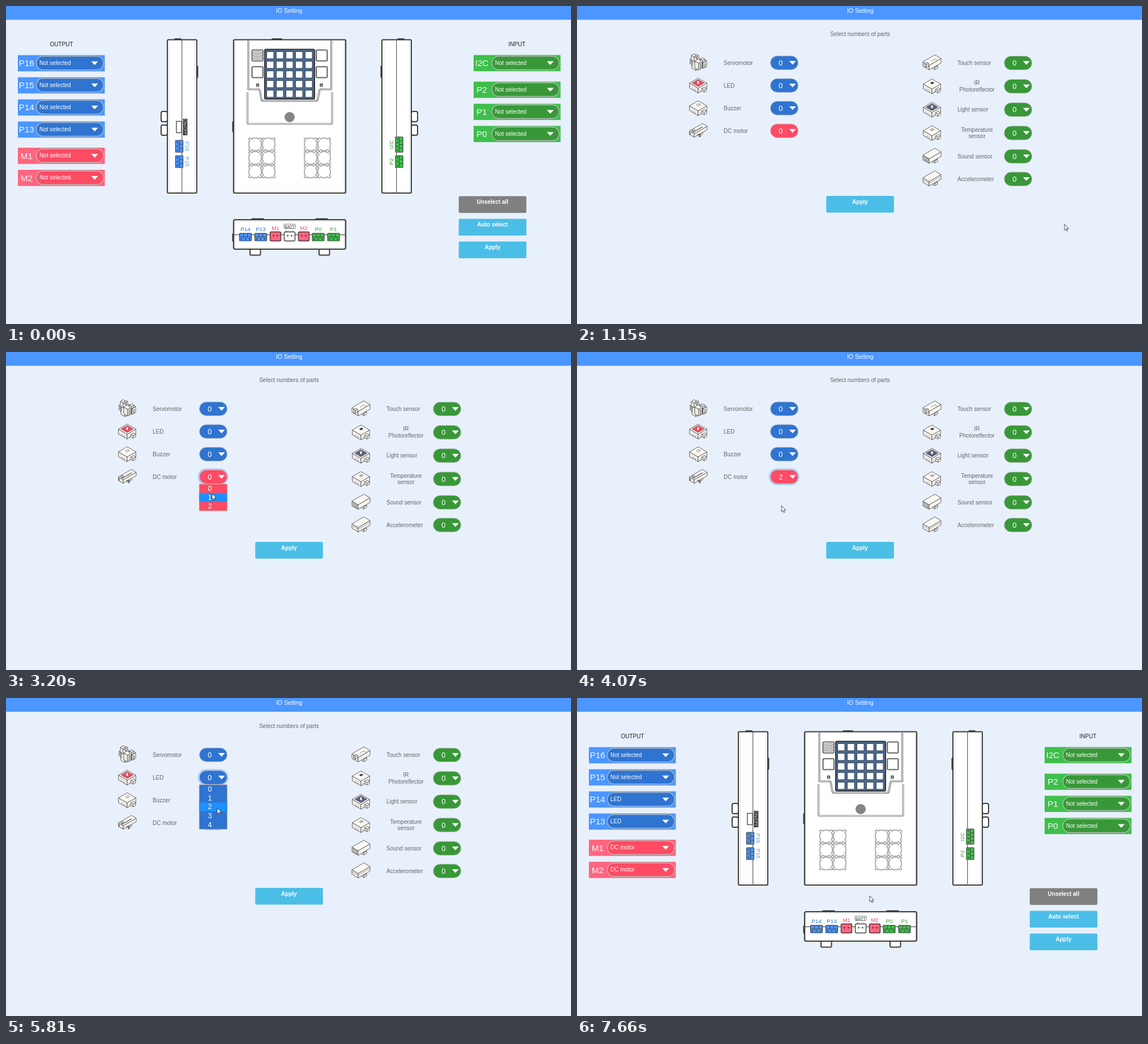
Write an HTML page that moves like this. It is 998x561 px and loops after 8.67 s.

```html
<!DOCTYPE html>
<html lang="en">
<head>
<meta charset="utf-8">
<title>IO Setting</title>
<style>
html, body { margin: 0; width: 100%; height: 100%; overflow: hidden; background: #e8f0fc; }
svg { display: block; width: 998px; height: 561px; font-family: "Liberation Sans", Arial, sans-serif; }
</style>
</head>
<body>
<svg id="stage" viewBox="0 0 998 561"></svg>
<script>
const LOOP = 8670;
const BLUE = '#4b96ff', NAVY = '#2f74d0', PINK = '#ff6680', RED = '#ff4b64';
const LIME = '#3fbf4b', GREEN = '#389838', SKY = '#4bbee7', INK = '#3c3c3c';

const text = (x, y, s, size = 10, fill = '#fff', more = '') =>
  `<text x="${x}" y="${y}" font-size="${size}" fill="${fill}" ${more}>${s}</text>`;
const mid = (x, y, s, size, fill, more = '') => text(x, y, s, size, fill, 'text-anchor="middle" ' + more);
const rect = (x, y, w, h, fill, stroke = 'none', sw = 1, r = 0) =>
  `<rect x="${x}" y="${y}" width="${w}" height="${h}" rx="${r}" fill="${fill}" stroke="${stroke}" stroke-width="${sw}"/>`;
const path = (d, fill = 'none', stroke = 'none', sw = 1) =>
  `<path d="${d}" fill="${fill}" stroke="${stroke}" stroke-width="${sw}" stroke-linejoin="round"/>`;
const move = (x, y, s, turn = 0) => `<g transform="translate(${x} ${y}) rotate(${turn})">${s}</g>`;
const box = (x, y, w, h, r = 2, sw = 2) => rect(x, y, w, h, '#fff', INK, sw, r);
const arrowDown = (x, y) => path(`M${x - 6} ${y}h12l-6 6.5z`, '#fff');
const double = (d, color) => path(d, 'none', color, 3.2) + path(d, 'none', '#fff', 1);
const button = (x, y, s, fill) =>
  rect(x, y, 119.5, 29.5, fill, 'none', 0, 2) + mid(x + 59.7, y + 13.6, s, 10, '#fff', 'font-weight="bold"');

// First screen: port selectors
function port(x, y, name, fill, dark, cls = '') {
  const right = x > 500;
  const px = right ? 858.4 : 53.6;
  return rect(x, y, 153.5, 28.6, fill) +
    mid(right ? 840.5 : 36.3, y + 19.5, name, 15.2, '#f4f8ff') +
    rect(px, y + 2, 118.6, 24, dark, '#b9b9b9', 1.3, 12) +
    text(px + 5.4, y + 17.2, 'Not selected', 10, '#fff', `class="${cls}"`) +
    arrowDown(px + 103, y + 11);
}

function plug(x, y, fill, turn = 0, w = 21) {
  const l = -w / 2, n = w > 24 ? 4 : 3, gap = w / n;
  let s = rect(l, -6.6, w, 13.2, fill, INK, 1.1, 1) + path(`M${l} 0h${w}`, 'none', INK, .9);
  for (let i = 0; i < n; i++) {
    const c = l + gap * (i + .5);
    if (i) s += path(`M${l + gap * i} -6.6v6.6`, 'none', INK, .9);
    s += rect(c - 1.1, 2.2, 2.2, 2.2, INK);
  }
  return move(x, y, s, turn);
}

const pair = (x, fill) => rect(x - 9.5, 398.5, 19, 16, fill, INK, 1.4, 2) +
  rect(x - 4.6, 404, 2.4, 2.4, INK) + rect(x + 2.2, 404, 2.4, 2.4, INK);

function gear(x, y) {
  const side = path('M-11 -11h3.500a1.600 1.800 0 0 0 3.200 0h8.600a1.600 1.800 0 0 0 3.200 0h3.500', 'none', '#9c9c9c', 1.5);
  return [0, 90, 180, 270].map(a => move(x, y, side, a)).join('');
}

function sideView(x, flip) {
  const feet = flip ? x + 52 : x - 11;
  let s = [186, 210].map(y => box(feet, y, 11, 18, 3)).join('');
  s += box(flip ? x - 1.5 : x + 50, 106, 3.5, 20, 1) + box(x + (flip ? 28 : 13), 58, 11, 4, 1);
  s += box(x, 59.5, 52, 270.5);
  s += path(`M${x + 3} 62v266M${x + 49} 62v266`, 'none', '#d4d4d4', 1);
  return s + path(`M${x + 25.7} 60v270`, 'none', '#666', 1.3);
}

function frontView() {
  let s = box(470, 58, 17, 4, 1) + box(400.5, 204, 4, 18, 1) + box(402, 59.5, 198, 270.5, 2, 2.2);
  s += path('M404.500 61.500v266M597.500 61.500v266', 'none', '#d4d4d4', 1);
  s += double('M428 61V147H445Q448 147 448.500 150L451 164Q451.500 167.500 455 167.500H547Q550.500 167.500 551 164L553.500 150Q554 147 557 147H574.500V61', '#777');
  s += double('M426.500 152V205Q426.500 208 429 208H573.500Q576 208 576 205V152', '#8a8a8a');
  s += rect(457, 76.5, 88, 87.5, '#4d6a8c', '#333', 2, 2);
  for (let i = 0; i < 25; i++)
    s += rect(460.5 + i % 5 * 17, 80.5 + (i / 5 | 0) * 17, 12.5, 12.5, '#fff', '#2f4358', 1);
  for (const x of [434.5, 548]) {
    for (const y of [77.5, 107])
      s += rect(x, y, 19.5, 19.5, '#fff', '#444', 1.6, 2) + rect(x + 2, y + 2, 15.5, 15.5, 'none', '#ccc', .8, 1);
  }
  for (const y of [81, 86, 91]) s += rect(436.5, y, 15.5, 2.6, '#fff', '#666', 1, 1);
  for (const x of [442.5, 555]) s += rect(x, 137.5, 4, 4, '#bbb', '#333', 1.2);
  s += '<circle cx="501" cy="196" r="9" fill="#858585"/>';
  for (const x of [440, 464, 538, 562])
    for (const y of [244, 268, 292]) s += gear(x, y);
  return s;
}

function bottomView() {
  let s = box(434, 375.5, 21, 5, 1) + box(547, 375.5, 21, 5, 1) + box(400.5, 402, 4, 13, 1);
  s += box(431, 427, 18.5, 12.5) + box(553, 427, 18.5, 12.5);
  s += box(402, 377, 198, 52, 3, 2.2) + path('M404.500 379.500h193v47h-193z', 'none', '#d4d4d4', 1);
  s += path('M402 403.500h198', 'none', '#666', 1.5);
  for (const [x, n, c] of [[423, 'P14', BLUE], [450, 'P13', BLUE], [551.5, 'P0', LIME], [578.5, 'P1', LIME]])
    s += plug(x, 407.7, c) + mid(x, 396.6, n, 9.8, c === LIME ? GREEN : NAVY);
  for (const [x, n] of [[476, 'M1'], [526, 'M2']]) s += pair(x, PINK) + mid(x, 394.8, n, 9.8, '#e84a5c');
  s += rect(491, 385, 20, 7.5, '#fff', '#555', .8, 1) + mid(501, 391.5, 'BATT', 7, '#333');
  return s + mid(495.5, 397.6, '+', 6, '#333') + mid(506, 397.6, '−', 6, '#333') + pair(501, '#fff');
}

function firstScreen() {
  let s = mid(98, 71, 'OUTPUT', 10, '#222') + mid(902.5, 71, 'INPUT', 10, '#222');
  ['P16', 'P15', 'P14', 'P13'].forEach((n, i) => s += port(21, 86.7 + 39 * i, n, BLUE, NAVY, i > 1 ? 'led' : ''));
  ['M1', 'M2'].forEach((n, i) => s += port(21, 250 + 39 * i, n, PINK, RED, 'motor'));
  [['I2C', 86.5], ['P2', 133.5], ['P1', 172.5], ['P0', 211.5]].forEach(([n, y]) => s += port(826, y, n, LIME, GREEN));
  s += button(799.7, 335.5, 'Unselect all', '#808080') + button(799.7, 375.5, 'Auto select', SKY) +
    button(799.7, 415.5, 'Apply', SKY);
  s += sideView(285, false) + sideView(664, true) + frontView() + bottomView();
  s += rect(301, 203.5, 9, 20, '#fff', '#555', 1.5) + rect(312.7, 199, 7.6, 29, '#222') +
    move(314, 213.5, mid(0, 0, 'ON/OFF', 7.4, '#fff'), 90);
  for (const [n, y] of [['P16', 247.5], ['P15', 274.5]])
    s += plug(306, y, BLUE, 90) + move(317.3, y, mid(0, 0, n, 9.8, BLUE), 90);
  for (const [n, y, w] of [['I2C', 244.5, 27], ['P2', 274.5, 21]])
    s += plug(694.5, y, LIME, 90, w) + move(683.5, y, mid(0, 0, n, 9.8, GREEN), -90);
  return s;
}

// Second screen: part icons from isometric blocks; (x, y) is the front corner of the top face
function iso(x, y, a, b, h, top = '#fbf8f4') {
  const k = .58, la = a * k, lb = b * k, line = '#555';
  return path(`M${x} ${y}l${-a} ${-la}v${h}l${a} ${la}z`, '#efebe6', line, .9) +
    path(`M${x} ${y}l${b} ${-lb}v${h}l${-b} ${lb}z`, '#f7f4ef', line, .9) +
    path(`M${x} ${y}l${-a} ${-la}l${b} ${-lb}l${a} ${la}z`, top, line, .9);
}
const peg = (x, y) => path(`M${x - 1.8} ${y}v-4q1.800 -2 3.600 0v4q-1.800 1.500 -3.600 0z`, '#fff', '#777', .7);
const lid = (c, w) => path(`M0 ${-4.2 - w * .58}l${w} ${w * .58}l${-w} ${w * .58}l${-w} ${-w * .58}z`, c, '#666', .6);
const cube = inner => iso(0, 5, 15.3, 15.3, 8.5) + inner + iso(10.5, 7.5, 4, 4.5, 4.5) +
  path('M-9 5v3M-5 7v3M4 8v3', 'none', '#777', .8);
const bar = (h, more = '') => iso(5, 8, 4, 5, 4) + iso(-5, 4.5, 11, 21, h) + more;
const slot = c => path('M-3 -5.500l4 -2.200 3 1.800 -4 2.200z', c, '#555', .7);

const icons = {
  servo: iso(-4, -2, 7, 8, 16) + iso(-7, -10, 5, 5, 9) + iso(-2, -11, 3, 3, 4) + iso(9, 0, 8, 6, 10) +
    iso(1, 1, 7, 6, 12) + iso(8, -4, 4, 4, 4) +
    path('M-14 -7v10M-11 -5v11M4 1v10M7 0v9M12 1v8', 'none', INK, 1.1),
  led: cube(lid('#f04a60', 11) + peg(0, -3)),
  buzzer: cube(slot('#fff')),
  motor: iso(4, 5, 3, 4, 3) + iso(-7, 5.5, 8.5, 23, 6) + iso(-8, 1, 3, 3, 2) +
    path('M-14 3v4M-2 8l4 -2v5l3 -2M-4 0l12 -7', 'none', INK, 1.1),
  touch: bar(8, iso(-10, 3, 3, 4, 5) + path('M-2 -3l7 -4 4 2', 'none', '#777', .8)),
  infra: cube(slot('#333')),
  light: cube(lid('#59607c', 11) + peg(0, -3)),
  heat: cube(slot('#d8d2cc')),
  sound: bar(8, path('M-14 0v8M-11.500 1.500v8M-9 3v8M-6.800 4.200v7', 'none', '#555', 1.2) +
    path('M-16 1.500l11 6M-16 4.500l11 6', 'none', '#eee', .7)),
  accel: bar(8, path('M-16 1.500l11 6 21 -12', 'none', '#888', .8))
};

function part(x, y, icon, label, fill, id = '') {
  const labels = label.split('|');
  const px = x + 127.3;
  let s = move(x, y, icons[icon]);
  if (labels.length > 1)
    labels.forEach((l, i) => s += mid(x + 79.5, y - 2.3 + 11.4 * i, l, 10, '#666'));
  else s += text(x + 45, y + 3.6, label, 10, '#666');
  return s + rect(px + .3, y - 12, 49, 24.4, fill, '#c3c3c3', .9, 12.2) +
    mid(px + 18.6, y + 4.7, '0', 13, '#fff', id && `id="${id}"`) + arrowDown(px + 39.5, y - 3);
}

const secondScreen = () => mid(500, 53, 'Select numbers of parts', 10, '#666') +
  part(214, 100, 'servo', 'Servomotor', NAVY) + part(214, 140, 'led', 'LED', NAVY, 'ledCount') +
  part(214, 180, 'buzzer', 'Buzzer', NAVY) + part(214, 220, 'motor', 'DC motor', RED, 'motorCount') +
  part(627, 100.3, 'touch', 'Touch sensor', GREEN) + part(627, 141.5, 'infra', 'IR|Photoreflector', GREEN) +
  part(627, 182.7, 'light', 'Light sensor', GREEN) + part(627, 223.8, 'heat', 'Temperature|sensor', GREEN) +
  part(627, 265, 'sound', 'Sound sensor', GREEN) + part(627, 305, 'accel', 'Accelerometer', GREEN) +
  button(440.3, 335, 'Apply', SKY);

const stage = document.getElementById('stage');
stage.innerHTML = rect(0, 0, 998, 561, '#e8f0fc') + rect(0, 0, 998, 24.3, BLUE) +
  mid(500.3, 11.8, 'IO Setting', 10.5) +
  `<g id="first">${firstScreen()}</g><g id="second">${secondScreen()}</g><g id="live"></g>`;
const $ = id => document.getElementById(id);
const first = $('first'), second = $('second'), live = $('live');

// Pointer: time, x, y
const track = [
  [210, 923, 509], [700, 861, 385], [1620, 861, 385], [2020, 338, 248], [2180, 310, 200], [2340, 322, 180],
  [2500, 371, 222], [2650, 363, 222], [3040, 363, 222], [3200, 364, 250], [3430, 361, 274], [3990, 361, 274],
  [4920, 381, 140], [5480, 381, 140], [5810, 373, 194], [6420, 373, 194], [6880, 517, 349], [LOOP, 517, 349]
];
const clicks = [[980, 1080], [2820, 2890], [3580, 3750], [5090, 5240], [6110, 6180], [7200, 7280]];
const within = (t, a, b) => t >= a && t < b;

// The screen was sampled about every 80 ms, so the pointer advances in steps
function pointer(t) {
  const i = track.findIndex((k, n) => n && t < k[0]);
  const [a, x, y] = track[i - 1], [b, x2, y2] = track[i];
  const n = Math.round((b - a) / 80);
  const u = Math.floor((t - a) / (b - a) * n) / n;
  const e = u * u * (3 - 2 * u);
  return [x + (x2 - x) * e, y + (y2 - y) * e];
}

const arrow = path('M0 0V10.400L2.400 8.200 4 11.900 5.700 11.200 4.100 7.600H7.500Z', '#fff', '#222', .8);
const hand = path('M-1 1q1 -1.800 2 0v4l4.500 1q1.800 .4 1.600 2.200l-.7 2.800v2h-5.500l-3.600 -4.500q-.5 -1.600 1 -1l.7 .7z', '#fff', '#222', .9);
const ring = y => rect(340, y - 13.2, 51.6, 26.8, 'none', '#a3cbfb', 2.4, 13.4);

function list(top, count, fill, y) {
  const row = 15.7;
  const on = Math.max(0, Math.min(count - 1, Math.floor((y - top) / row)));
  let s = rect(341.3, top, 49.4, row * count, fill, '#d8a08c', .8);
  for (let i = 0; i < count; i++) {
    if (i === on) s += rect(341.3, top + row * i, 49.4, row, '#1e90ff');
    s += mid(360, top + row * i + 12, i, 13);
  }
  return s;
}

function overlay(t) {
  let s = '';
  if (t < 210) return s;
  const [x, y] = pointer(t);
  if (within(t, 2890, 5170)) s += ring(220);
  if (within(t, 5170, 7200)) s += ring(140);
  if (within(t, 2890, 3750)) s += list(233, 3, RED, y);
  if (within(t, 5170, 6180)) s += list(153, 5, NAVY, y);
  if (clicks.some(([a, b]) => within(t, a, b)))
    s += `<circle cx="${x}" cy="${y}" r="7.7" fill="#e6f01e" fill-opacity=".6"/>`;
  if (within(t, 7280, 7660)) return s;
  const overButton = t < 1080
    ? within(x, 800, 919) && (within(y, 375, 405) || within(y, 415, 445))
    : within(t, 1150, 7280) && within(x, 440, 560) && within(y, 335, 365);
  return s + move(x, y, overButton ? hand : arrow);
}

let shown = null;
function draw() {
  const t = performance.now() % LOOP;
  const parts = within(t, 1150, 7280), done = t >= 7280;
  first.style.display = parts ? 'none' : '';
  second.style.display = parts ? '' : 'none';
  $('motorCount').textContent = t >= 3750 ? 2 : 0;
  $('ledCount').textContent = t >= 6180 ? 2 : 0;
  for (const [cls, name] of [['led', 'LED'], ['motor', 'DC motor']])
    for (const el of first.getElementsByClassName(cls)) el.textContent = done ? name : 'Not selected';
  const html = overlay(t);
  if (html !== shown) live.innerHTML = shown = html;
  requestAnimationFrame(draw);
}
draw();
</script>
</body>
</html>
```
